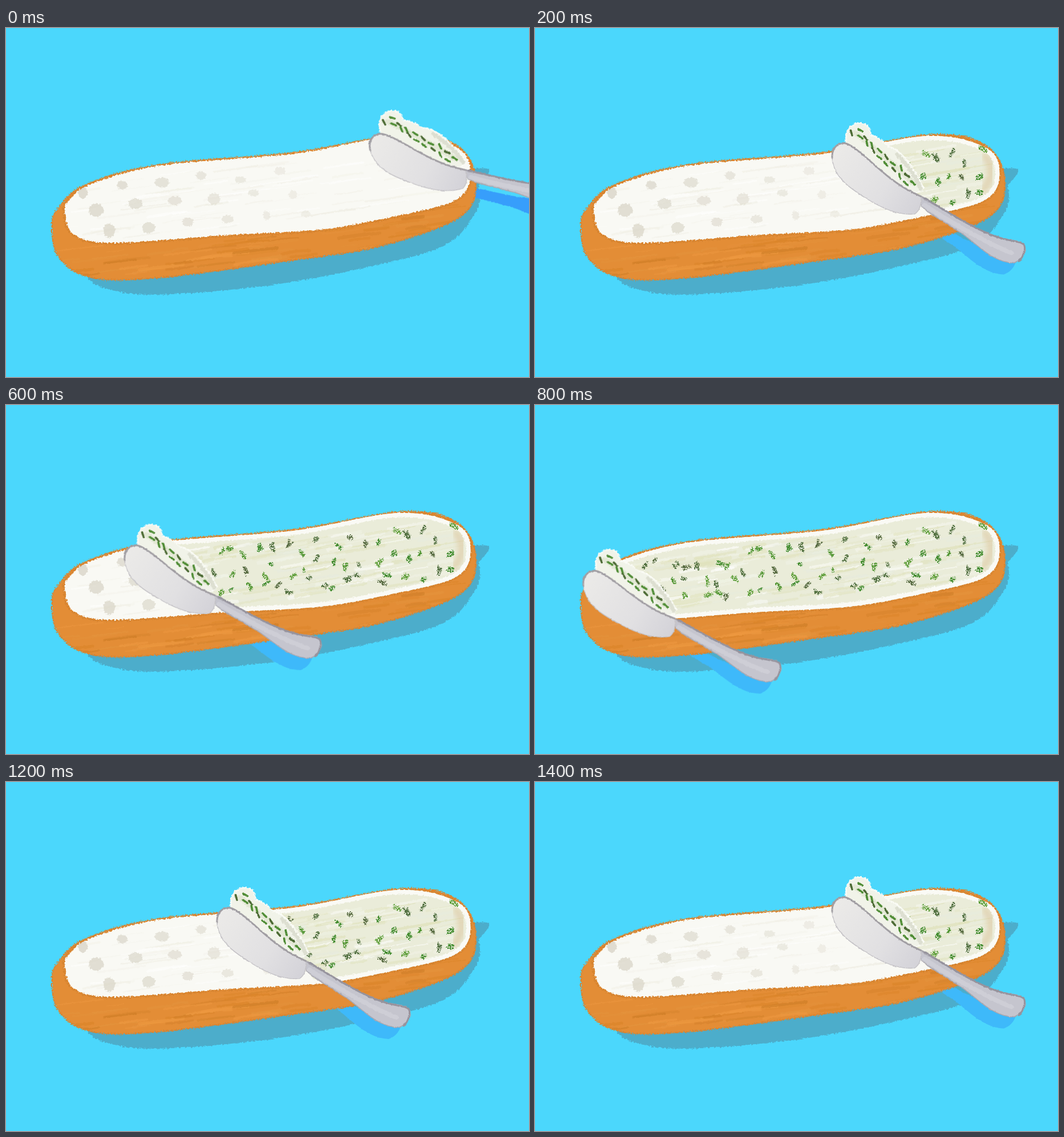
Recreate the animation shown at these times as an HTML page. Size 917 by 611 pixels, loop 1.6 s.

```html
<!DOCTYPE html>
<html lang="en">
<head>
<meta charset="utf-8">
<title>Spreading cream on bread</title>
<style>
  html, body { margin: 0; width: 100%; height: 100%; overflow: hidden; background: #4bd7fc; }
  svg { display: block; width: 100%; height: 100%; }
  path, line { stroke-linecap: round; stroke-linejoin: round; }
</style>
</head>
<body>
<svg viewBox="0 0 917 611">
  <defs>
    <filter id="rough" x="-10%" y="-15%" width="120%" height="130%" color-interpolation-filters="sRGB">
      <feTurbulence type="fractalNoise" baseFrequency=".3" numOctaves="2" seed="4"/>
      <feDisplacementMap in="SourceGraphic" scale="6" xChannelSelector="R" yChannelSelector="G"/>
    </filter>
    <filter id="soft" x="-10%" y="-15%" width="120%" height="130%" color-interpolation-filters="sRGB">
      <feTurbulence type="fractalNoise" baseFrequency=".2" numOctaves="2" seed="9"/>
      <feDisplacementMap in="SourceGraphic" scale="3" xChannelSelector="R" yChannelSelector="G"/>
    </filter>
    <filter id="chalk" x="-10%" y="-15%" width="120%" height="130%" color-interpolation-filters="sRGB">
      <feTurbulence type="fractalNoise" baseFrequency=".42" numOctaves="2" seed="7" result="n"/>
      <feDisplacementMap in="SourceGraphic" in2="n" scale="7" xChannelSelector="R" yChannelSelector="G" result="d"/>
      <feColorMatrix in="n" values="0 0 0 0 0  0 0 0 0 0  0 0 0 0 0  7 0 0 0 -2.6" result="m"/>
      <feComposite in="d" in2="m" operator="in"/>
    </filter>
    <filter id="blur" x="-20%" y="-20%" width="140%" height="140%"><feGaussianBlur stdDeviation="4"/></filter>
    <linearGradient id="steel" gradientUnits="userSpaceOnUse" x1="375" y1="235" x2="525" y2="335">
      <stop offset="0" stop-color="#ebeae8"/><stop offset=".6" stop-color="#e1e0e2"/><stop offset="1" stop-color="#d3d2d8"/>
    </linearGradient>
    <path id="crust"/>
    <path id="top"/>
    <clipPath id="inCrust"><use href="#crust"/></clipPath>
    <clipPath id="inTop"><use href="#top"/></clipPath>
    <clipPath id="behind"><path id="wake" d="M425 100L436 215L516 315L570 385L1300 500V0Z"/></clipPath>
    <path id="blade" d="M392 220C376 220 366 238 372 258C380 284 400 298 430 317S488 347 515 344Q527 336 526 314C500 304 470 280 440 255S406 222 392 220Z"/>
    <path id="grip" d="M522 313Q520 330 545 345L600 380C625 398 650 428 688 430Q704 424 709 408Q708 393 693 391C645 384 620 370 570 340Z"/>
    <path id="dollop" d="M395 220C390 200 402 185 418 185S436 196 438 206Q456 212 467 225Q500 234 530 298Q524 312 500 302C465 280 430 246 395 220Z"/>
  </defs>

  <rect width="917" height="611" fill="#4bd7fc"/>
  <path id="shade" fill="#4cadcb" filter="url(#rough)"/>
  <g class="pose"><g class="grip" filter="url(#soft)">
    <use id="gripShade" href="#grip" x="-17" y="20"/>
  </g></g>

  <g filter="url(#rough)"><use href="#crust" fill="#e38d36"/></g>
  <g clip-path="url(#inCrust)">
    <g id="baked" filter="url(#soft)"></g>
    <use href="#top" fill="none" stroke="#cf7f2d" stroke-width="7" opacity=".7" filter="url(#chalk)"/>
  </g>
  <use href="#crust" fill="none" stroke="#d9822e" stroke-width="2.5" filter="url(#chalk)"/>
  <use href="#top" fill="#f9f9f4" filter="url(#rough)"/>
  <g clip-path="url(#inTop)">
    <g id="crumb" filter="url(#soft)"></g>
    <g id="holes" fill="#d9d5c8" filter="url(#rough)"></g>
  </g>

  <g id="spread" clip-path="url(#behind)"><g clip-path="url(#inTop)">
    <use href="#top" fill="#eaecd9"/>
    <g id="cream" filter="url(#soft)"></g>
    <path d="M790 225Q810 250 787 283" fill="none" stroke="#dcc59c" stroke-width="14" opacity=".55" filter="url(#blur)"/>
    <use href="#top" fill="none" stroke="#fafaf5" stroke-width="15" filter="url(#rough)"/>
    <g id="herbs" filter="url(#chalk)"></g>
  </g></g>

  <g class="pose" fill="none">
    <g filter="url(#rough)">
      <use href="#dollop" fill="#f1f3e9" stroke="#fbfcf7" stroke-width="2"/>
      <path d="M410 202Q455 235 512 290" stroke="#dfe4cf" stroke-width="9" opacity=".75"/>
      <path d="M484 240Q512 268 525 300" stroke="#c9ccb9" stroke-width="7" opacity=".5"/>
    </g>
    <g id="flecks" filter="url(#soft)"></g>
    <g class="grip" filter="url(#soft)">
      <use href="#grip" fill="#c5c5ce" stroke="#aaa8b1" stroke-width="1.6"/>
      <path d="M532 329Q580 360 625 384T685 412" stroke="#d3d3da" stroke-width="8" opacity=".7"/>
      <path d="M530 315C570 339 610 365 650 381S712 388 707 408Q704 422 697 427" stroke="#96939d" stroke-width="3"/>
    </g>
    <g filter="url(#soft)">
      <use href="#blade" fill="url(#steel)" stroke="#c3c1c5" stroke-width="1.4"/>
      <path d="M370 246C369 226 381 220 392 220C412 225 440 257 470 280S510 305 527 314" stroke="#a19ea3" stroke-width="3"/>
    </g>
  </g>
</svg>
<script>
const $ = id => document.getElementById(id);

let seed = 11;
const rnd = (a = 0, b = 1) => {
  seed = (seed * 16807) % 2147483647;
  return a + (b - a) * seed / 2147483647;
};
const pick = list => list[Math.floor(rnd(0, list.length))];

function add(parent, name, attrs) {
  const el = document.createElementNS("http://www.w3.org/2000/svg", name);
  for (const key in attrs) el.setAttribute(key, attrs[key]);
  parent.appendChild(el);
}

// closed Catmull-Rom curve through a few key points
function curve(text) {
  const p = text.split(" ").map(q => q.split(",").map(Number));
  const n = p.length, at = i => p[(i + n) % n];
  const ctrl = (q, r, s, k) => q.map((v, j) => v + k * (s[j] - r[j]) / 6);
  let d = "M" + p[0];
  for (let i = 0; i < n; i++) {
    const [a, b, c, e] = [at(i - 1), at(i), at(i + 1), at(i + 2)];
    d += "C" + [ctrl(b, a, c, 1), ctrl(c, b, e, -1), c].join(" ");
  }
  return d + "Z";
}

const outlines = {
  crust: "81,345 92,400 150,437 270,437 500,407 660,381 800,328 823,258 785,202 690,187 505,218 270,239 140,274 92,315",
  top: "103,322 120,362 190,376 380,363 550,353 680,330 785,303 814,262 794,212 690,189 505,220 270,241 150,273 112,300",
  shade: "145,430 230,466 450,452 650,415 770,380 822,325 829,280 800,250 300,380"
};
for (const id in outlines) $(id).setAttribute("d", curve(outlines[id]));

const middle = x => 322 - (x - 150) * .106;
const sideLine = x => 413 - Math.max(0, x - 220) * .135;

// dry brush strokes following the slant of the loaf
function streaks(id, count, colors, line, spread, thick, slope) {
  for (let i = 0; i < count; i++) {
    const x = rnd(85, 765), y = line(x) + rnd(-spread, spread), len = rnd(25, 85);
    add($(id), "path", {
      d: `M${x} ${y}q${len / 2} ${rnd(-3, 3) - len * .08} ${len} ${-len * slope}`,
      stroke: pick(colors), "stroke-width": rnd(1, thick), opacity: rnd(.25, .6), fill: "none"
    });
  }
}

function dash(parent, x, y, angle, half, stroke, width) {
  const dx = Math.cos(angle) * half, dy = Math.sin(angle) * half;
  add(parent, "line", { x1: x - dx, y1: y - dy, x2: x + dx, y2: y + dy, stroke, "stroke-width": width });
}

streaks("baked", 85, ["#d98428", "#cb7b25", "#ee9a42", "#e4943f"], sideLine, 28, 6, .12);
streaks("crumb", 90, ["#ffffff", "#f3f2e9", "#eeece1"], middle, 52, 4, .14);
streaks("cream", 200, ["#ffffff", "#f4f6ec", "#e0e2bd", "#dddfb5", "#e6ebdf"], middle, 53, 7, .17);

// holes shrink and fade towards the right
for (let i = 0; i < 18; i++) {
  const x = 135 + i * 23, size = 12 - i * .25;
  add($("holes"), "ellipse", {
    cx: x, cy: middle(x) + (i % 3 - 1) * 36 + rnd(-8, 8),
    rx: size * rnd(.7, 1.2), ry: size * rnd(.6, 1.1), opacity: .8 - i * .03
  });
}

// chopped herbs: little scribbles on a loose grid
const greens = ["#4f9430", "#5a9c35", "#4b6b3a", "#55693f", "#3f8a2c"];
for (let col = 0; col < 24; col++) {
  for (let row = -1; row <= 1; row++) {
    const x = 193 + col * 25.5 + rnd(-11, 11), y = middle(x) + row * 33 + rnd(-13, 13);
    const color = pick(greens), tilt = rnd(-1.2, 1.7), size = rnd(2, 6);
    for (let i = 0; i < 3; i++)
      dash($("herbs"), x + rnd(-3, 3), y + rnd(-3, 3), tilt + rnd(-.5, .5), size, color, rnd(3, 5));
  }
}

// flecks along the ridge of cream pushed by the blade
for (let i = 0; i < 18; i++) {
  const t = i / 17, side = i % 2 ? rnd(3, 10) : rnd(-8, 0);
  dash($("flecks"), 408 + t * 100 + side * .7, 198 + t * 95 - side * .7,
    rnd(.5, 1.4), 4.5, i % 3 ? "#4f8c35" : "#4d6b35", 3.6);
}

// knife poses: tip of the blade, tilt, bend of the handle
const TIP = { x: 392, y: 220 };
const POSES = [
  { x: 655, y: 185, tilt: -12, bend: -6 },
  { x: 543, y: 201.5, tilt: 0, bend: 0 },
  { x: 392, y: 220, tilt: 0, bend: 0 },
  { x: 229, y: 245.5, tilt: -2.3, bend: 0 },
  { x: 105, y: 290, tilt: -4, bend: 2 }
];
const STEP = 200, LAST = POSES.length - 1, LOOP = 2 * LAST * STEP;
let shown = -1;

function show(i) {
  const { x, y, tilt, bend } = POSES[i];
  const move = `translate(${x} ${y}) rotate(${tilt}) translate(${-TIP.x} ${-TIP.y})`;
  const setAll = (sel, value) => document.querySelectorAll(sel).forEach(el => el.setAttribute("transform", value));
  setAll(".pose, #wake", move);
  setAll(".grip", `rotate(${bend} 522 325)`);
  $("spread").style.display = i ? "" : "none";
  $("gripShade").setAttribute("fill", i ? "#3eb9fa" : "#379efb");
}

const start = performance.now();
function tick(now) {
  const step = Math.floor(Math.max(0, now - start) % LOOP / STEP);
  const i = LAST - Math.abs(LAST - step);
  if (i !== shown) show(shown = i);
  requestAnimationFrame(tick);
}
tick(start);
</script>
</body>
</html>
```
